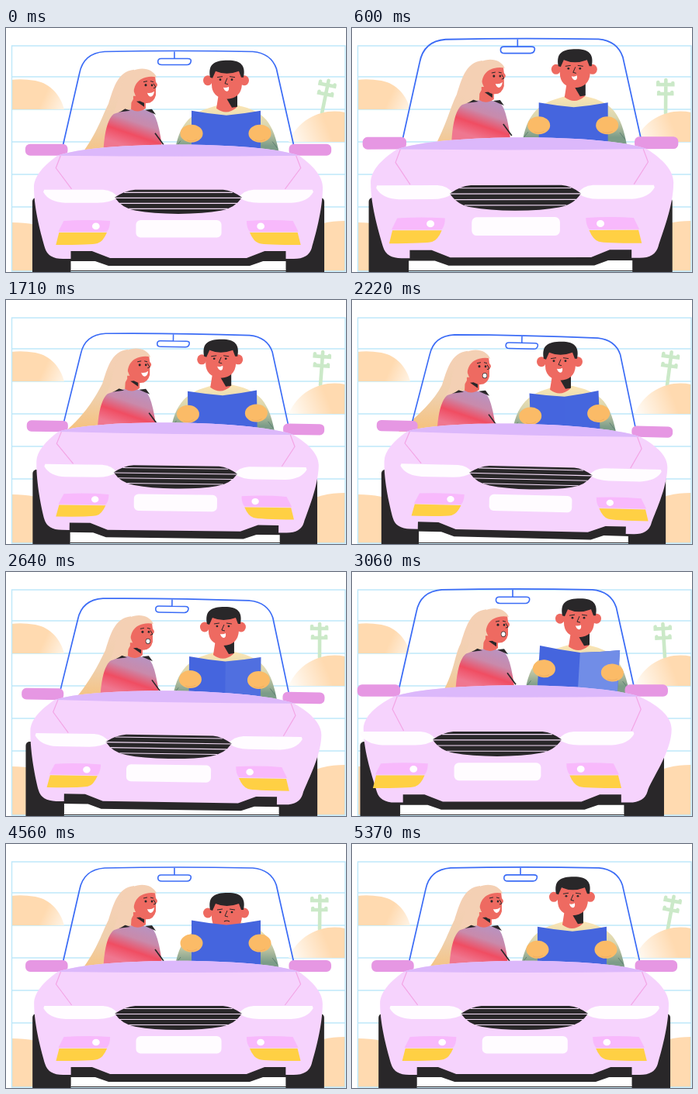
Recreate the animation shown at these times as an HTML page with a canvas. Size 438 px wide and 315 px high, loop 5400 ms.

```html
<!DOCTYPE html>
<html lang="en">
<head>
<meta charset="utf-8">
<title>Road trip</title>
<style>
html, body { margin: 0; width: 100%; height: 100%; overflow: hidden; background: #fff; }
canvas { display: block; }
</style>
</head>
<body>
<canvas id="stage" width="438" height="315"></canvas>
<script>
const c = document.getElementById('stage').getContext('2d');
const LOOP = 5400, MID = 222, GROUND = 314, ROOF = 31;
const SKIN = '#ee6a61', INK = '#292729', BLUE = '#3b6cf6', PINK = '#f6d3fd', HAIR = '#f4d0b4';

// The ride; every part derives its motion from these few key points
const ride = [
  { time: 0, roof: 31, turn: 0, tilt: 0, lean: 0, nod: 0 },
  { time: 1200, roof: 38, turn: -19, tilt: 0, lean: 3, nod: -2 },
  { time: 2220, roof: 47, turn: 9, tilt: .023, lean: -16, nod: 0 },
  { time: 3060, roof: 23, turn: -35, tilt: 0, lean: 8, nod: -2 },
  { time: 3840, roof: 24, turn: -20, tilt: -.03, lean: -10, nod: -10 },
  { time: 4560, roof: 31, turn: 0, tilt: 0, lean: 0, nod: 21 }];

const bump = (t, peak, width) => Math.exp(-(((t - peak) / width) ** 2));

// Smooth periodic curve through the key points
function track(name, t) {
  const n = ride.length;
  const key = i => {
    const turns = Math.floor(i / n), k = ride[i - turns * n];
    return [k.time + turns * LOOP, k[name]];
  };
  let i = 0;
  while (key(i + 1)[0] <= t) i++;
  const [[t0, v0], [t1, v1], [t2, v2], [t3, v3]] = [key(i - 1), key(i), key(i + 1), key(i + 2)];
  const span = t2 - t1, p = (t - t1) / span;
  const m = (v2 - v0) / (t2 - t0) * span, q = (v3 - v1) / (t3 - t1) * span;
  const rise = v2 - v1;
  return v1 + p * (m + p * (3 * rise - 2 * m - q + p * (m + q - 2 * rise)));
}

function pose(t) {
  const [turn, tilt, lean, nod] = ['turn', 'tilt', 'lean', 'nod'].map(name => track(name, t));
  const roof = track('roof', t) - 31 * bump(t, 450, 220);
  const size = 1.01 + .002 * (ROOF - roof);
  const stretch = 1 + (ROOF - roof) / (GROUND - ROOF);
  return {
    t, turn, tilt, lean, nod, size, stretch,
    lift: 206 * (1 - stretch),
    wide: size + .0015 * Math.abs(turn),
    cabin: .35 * turn + .3 * lean,
    shoulder: .25 * turn,
    base: .45 * turn - 220 * tilt
  };
}

function fill(path, color) {
  c.fillStyle = color;
  c.fill(new Path2D(path));
}
function line(path, color, width = 1.5) {
  c.strokeStyle = color;
  c.lineWidth = width;
  c.stroke(new Path2D(path));
}
function oval(x, y, rx, ry, color) {
  c.fillStyle = color;
  c.beginPath();
  c.ellipse(x, y, rx, ry, 0, 0, 7);
  c.fill();
}
function box(x, y, w, h, r, color) {
  c.fillStyle = color;
  c.beginPath();
  c.roundRect(x, y, w, h, r);
  c.fill();
}
function blend(x0, y0, x1, y1, ...colors) {
  const g = c.createLinearGradient(x0, y0, x1, y1);
  colors.forEach((s, i) => g.addColorStop(i / (colors.length - 1), s));
  return g;
}
function layer(x, y, draw, angle = 0, px = 0, py = 0, sx = 1, sy = 1) {
  c.save();
  c.translate(x + px, y + py);
  c.rotate(angle);
  c.scale(sx, sy);
  c.translate(-px, -py);
  draw();
  c.restore();
}
const widen = (x, scale, draw) => layer(x, 0, draw, 0, MID, 0, scale);

// Draws once as given and once mirrored about the middle
function bothSides(draw) {
  draw();
  widen(0, -1, draw);
}

function scenery({ t }) {
  c.fillStyle = '#fff';
  c.fillRect(0, 0, 438, 315);
  for (let y = 63; y < 240; y += 42) line(`M7 ${y}H437`, '#bee8fa', 1.4);
  const sway = Math.cos(t / LOOP * 30 * Math.PI);
  layer(-2 + 2 * sway, 0, () => {
    c.lineCap = 'round';
    line('M407 110V67M397 70V73H416V71M398 83V85H415V83', '#cbe9c8', 4.6);
  }, .07 + .13 * sway, 407, 110);
  c.save();
  c.beginPath();
  c.rect(7, 23, 430, 291);
  c.clip();
  fill('M7 67Q20 65 38 68C58 72 70 87 75 105H7Z', blend(25, 75, 75, 98, '#ffdab0', '#ffdab0', '#fff2e2'));
  fill('M364 147C378 115 410 103 437 109V147Z', blend(366, 140, 412, 122, '#fffaf3', '#ffdab0'));
  fill('M7 251Q40 251 60 262V314H7Z', '#ffdab0');
  fill('M437 249Q405 249 385 262V314H437Z', '#ffdab0');
  c.restore();
  line('M7.5 23H437V314H7.5Z', '#bee8fa', 1.4);
}

function woman({ t, lift, lean }) {
  const tip = 92 + 2 * lean;
  const top = lift - 2;
  const talking = Math.abs(t - 2640) < 600;
  fill(`M${165 + lean} ${56 + top}C${143 + lean} ${58 + top} ${138 + lean} ${82 + top} ${132 + lean} ${100 + top}
    C${122 + lean} ${120 + top} ${tip + 25} ${138 + lift} ${tip} 170H${145 + lean}L${168 + lean} ${105 + top}Z`,
    blend(0, 85, 0, 162, HAIR, '#efd0ad', '#f5c383'));
  layer(lean - 1, lift - 1, () => {
    fill('M126 185Q125 113 146 109Q168 103 188 109Q200 117 205 185Z',
      blend(176, 108, 160, 155, '#ba92be', '#c98aab', '#f04d62', '#ef7790'));
    fill('M145 110L153 105L161 108ZM180 107L189 106L194 113Z', INK);
    line('M193 137L204 152', INK, 1.6);
  });
  layer(lean, top, () => {
    fill('M162 90H180V106Q170 113 161 107Z', SKIN);
    fill('M168 97L178 96V104Z', INK);
    fill('M162 66Q180 56 192 64L193 72Q197 76 193 79L193 89Q190 101 178 99Q163 95 162 66Z', SKIN);
    fill('M194 66C188 51 164 51 153 66C143 82 146 103 136 114Q157 109 164 94C164 80 166 70 180 66Q188 64 194 66Z', HAIR);
    oval(180, 76, 1.5, 1.6, INK);
    oval(188, 76, 1.3, 1.5, INK);
    line('M177 72L182 71M186 71L190 72M190 74L193 79L190 80', INK, 1);
    if (talking) {
      oval(187, 88, 3.2, 3.6, INK);
      oval(187, 88, 2.5, 2.8, '#fff');
    } else fill('M182 86Q187 87 191 84Q190 91 186 91Q183 90 182 86Z', '#fff');
  });
}

function man({ t, lift, lean, nod }) {
  const open = bump(t, 3060, 350);
  layer(.7 * lean, lift, () => {
    fill('M216 175C219 125 238 110 263 103Q284 95 306 102C335 110 347 125 354 175Z',
      blend(0, 102, 0, 153, '#f9e4b4', '#d9d6af', '#7c9c88'));
    line('M218 155L225 146M343 147L350 156', '#5f8173', 1);
  });
  layer(lean, lift + nod, () => {
    fill('M274 85H297V103Q284 114 271 104Z', SKIN);
    fill('M284 91L298 85V102L291 103Z', INK);
    oval(260, 68, 6, 6.5, SKIN);
    oval(307, 68, 6, 6.5, SKIN);
    fill('M265 56H304V73Q303 91 284 92Q265 90 265 73Z', SKIN);
    fill('M263 64C260 47 268 42 286 42C303 42 309 49 306 64H303L300 56Q284 62 270 56L266 65Z', INK);
    line('M272 64L279 63M288 63L295 64M285 65L282 72L286 73', INK, 1);
    oval(276, 67, 1.4, 1.3, INK);
    oval(291, 67, 1.4, 1.3, INK);
    if (nod > 12) line('M281 79Q284 77 288 79', INK, 1.1);
    else fill('M280 77Q284 78 287 76Q288 82 284 82Q281 81 280 77Z', '#fff');
  });
  layer(.6 * lean + 4 * open, lift - .4 * nod - 4 * open, () => {
    const w = 1 + .16 * open, edge = x => 284 + (x - 284) * w;
    const half = x => `M284 113Q${edge((284 + x) / 2)} 111 ${edge(x)} 107V185H284Z`;
    fill(half(239) + half(328), '#4565de');
    c.globalAlpha = open;
    fill(half(328), '#718de7');
    c.globalAlpha = 1;
    for (const x of [239, 327]) {
      oval(x, 136.5, 14.5, 11.5, '#fbbb67');
      line(`M${x - 6} 145Q${x} 148 ${x + 7} 144`, '#eba65c', .7);
    }
  }, .06 * open + .003 * Math.min(0, lean + 3), 284, 130);
}

function wheels({ base, size, wide }) {
  widen(base, (size + wide) / 2, () => {
    bothSides(() => box(36, 219, 49, 100, 5, INK));
    line('M85 313.5H360', INK, 1);
  });
}

function cabin({ cabin, turn, size }) {
  widen(cabin, size, () => {
    line('M72 165L96 59Q101 33 128 31Q220 29 317 31Q340 33 347 53L372 165', BLUE, 1.7);
    line('M217 31V40M200 40H234Q239 40 238 44Q237 48 233 48H201Q196 48 196 44Q196 40 200 40Z', BLUE, 1.6);
  });
  widen(cabin + .15 * turn, size, () => bothSides(() => box(27, 150, 54, 15, 6, '#e697e3')));
}

function shell({ size, wide, cabin, turn, shoulder, base }) {
  const place = (scale, shift) => (x, y) => `${MID + (x - MID) * scale + shift} ${y} `;
  const hood = place(size, cabin), side = place(wide, shoulder);
  const foot = place(size, base), nose = place(size, turn);

  // Lip under the bumper
  widen(base, size, () =>
    fill('M80 286H364V301H330L313 307H133L116 301H80Z', INK));

  const arc = 'M' + hood(68, 165) + 'C' + hood(120, 146) + hood(324, 146) + hood(376, 165);
  fill(arc
    + 'C' + side(394, 178) + side(406, 192) + side(406, 206)
    + 'C' + side(406, 235) + foot(396, 270) + foot(392, 284)
    + 'Q' + foot(388, 298) + foot(369, 298)
    + 'L' + foot(359, 298) + foot(359, 288) + foot(332, 288) + foot(309, 297)
    + foot(135, 297) + foot(112, 288) + foot(85, 288) + foot(85, 298) + foot(75, 298)
    + 'Q' + foot(56, 298) + foot(52, 284)
    + 'C' + foot(48, 270) + side(38, 235) + side(38, 206)
    + 'C' + side(38, 192) + side(50, 178) + hood(68, 165) + 'Z', PINK);
  fill(arc + 'Q' + hood(222, 167) + hood(68, 165) + 'Z', '#dcb8fb');
  for (const m of [-1, 1])
    line('M' + hood(MID + m * 150, 165) + 'L' + hood(MID + m * 156, 181) + side(MID + m * 136, 208), '#f3a6e6', 1.2);

  widen(turn, size, () => {
    bothSides(() => {
      fill('M51 209H126Q139 210 145 219Q135 226 119 226H78Q57 225 50 212Z', '#fffcff');
      fill('M76 249Q105 247 135 249Q135 258 131 263H69Z', '#f8b9fc');
      oval(117, 256, 4.8, 4.3, '#fff');
      fill('M70 264H131Q126 276 119 278Q112 280 66 280Z', '#ffd044');
    });
    fill('M141 219Q154 210 167 209H279Q291 210 303 219Q294 233 276 236Q255 240 222 240Q189 240 168 236Q150 233 141 219Z', INK);
    line('M153 212.5H291M141 219.5H303M147 226.5H297M159 233.5H285', '#f3dcf6', 1.1);
    box(168, 248, 109, 22.5, 6, '#fffcff');
  });
}

function draw(t) {
  const now = pose(t);
  scenery(now);
  woman(now);
  man(now);
  wheels(now);
  layer(0, 0, () => layer(0, 0, () => {
    cabin(now);
    shell(now);
  }, 0, 0, GROUND, 1, now.stretch), now.tilt, MID, 200);
}

const start = performance.now();
function tick(now) {
  draw(Math.max(0, now - start) % LOOP);
  requestAnimationFrame(tick);
}
draw(0);
requestAnimationFrame(tick);
</script>
</body>
</html>
```
